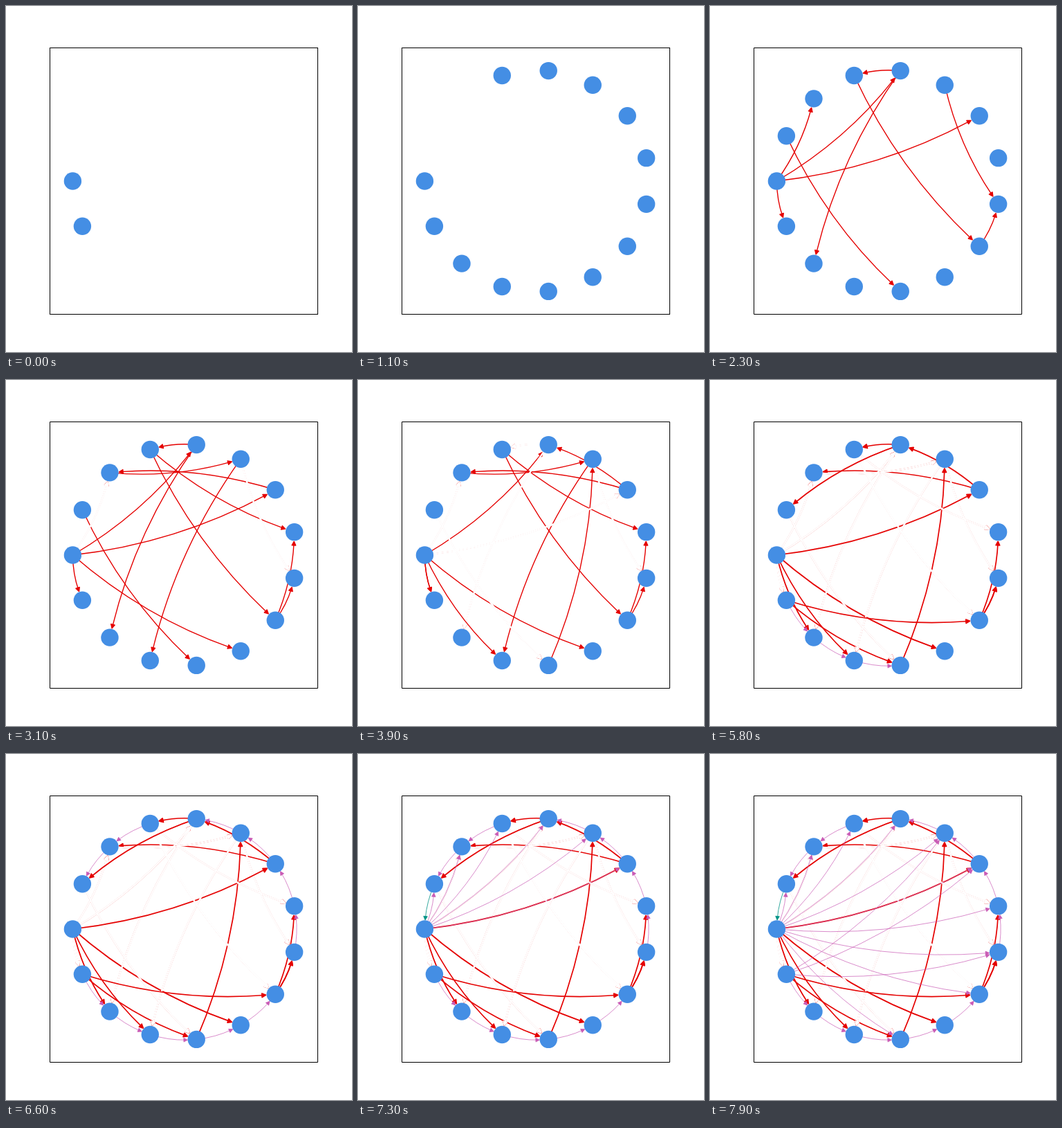
Recreate the animation shown at these times as an HTML page with a canvas. Size 500 px wide and 500 px high, loop 8000 ms.

```html
<!DOCTYPE html>
<html lang="en">
<head>
<meta charset="utf-8">
<title>Graph edges</title>
<style>
  html, body { margin: 0; width: 100%; height: 100%; overflow: hidden; background: #fff; }
  canvas { display: block; }
</style>
</head>
<body>
<canvas id="stage" width="500" height="500"></canvas>
<script>
const ctx = document.getElementById('stage').getContext('2d');
const LOOP = 8000, STEP = 100, EDGES_FROM = 14, BOLD_FROM = 52;
const REACH = 12;

const nodes = Array.from({ length: 15 }, (_, k) => {
  const a = k * Math.PI * 2 / 15;
  return { x: 258.3 - 161.9 * Math.cos(a), y: 253 + 160.3 * Math.sin(a) };
});

// One word per step: from>to, "+" joins edges, "." is a pause.
// Prefix: none = red, x = erase, p = purple, t = teal.
const script = `
  0>1 14>4 0>13 6>7 11>12
  0>11 0>9 11>2 12>6 10>7
  0>5 10>3 12>8 13>10
  9>13 x0>13 6>8 x10>7 0>1 x14>4 4>10 x11>2 x0>9
  9>11 x11>12 0>3 x0>11 x12>6 .
  11>12 0>9 0>2 x0>1 x12>6 1>4 6>7 x10>3 x0>1
  x13>10 x12>8 11>14 1>6
  p1>2 p2>3 p3>4 p4>5 p5>6 p7>8 p8>9 p9>10 p10>11 p12>13 p13>14 t14>0
  p0>14 p0>13 p0>12 p0>11 p0>10 p0>9 p0>8 p0>7 p0>6 p0>4
  p1>9 p1>7+p1>10`;

const pens = {
  '': { color: '#e50000', line: 1.4, head: 1.4 },
  x: { color: '#fff', line: 2.4, head: 1.6 },
  p: { color: '#c95bb5', line: 0.7, head: 0.7 },
  t: { color: '#029386', line: 0.8, head: 0.8 }
};

const mix = (a, b, t) => ({ x: a.x + (b.x - a.x) * t, y: a.y + (b.y - a.y) * t });

function makeEdge(word) {
  const [, kind, from, to] = word.match(/([xpt]?)(\d+)>(\d+)/);
  const a = nodes[from], b = nodes[to], mid = mix(a, b, 0.5);
  const c = { x: mid.x - 0.1 * (b.y - a.y), y: mid.y + 0.1 * (b.x - a.x) };
  // Cut the curve where it meets the rim of the end node.
  let t = 1, bend, near, tip;
  do {
    t -= 0.001;
    bend = mix(a, c, t);
    near = mix(c, b, t);
    tip = mix(bend, near, t);
  } while (Math.hypot(b.x - tip.x, b.y - tip.y) < REACH);
  return { kind, a, bend, tip, angle: Math.atan2(tip.y - bend.y, tip.x - bend.x) };
}

const steps = script.trim().split(/\s+/).map(word =>
  word === '.' ? [] : word.split('+').map(makeEdge));

function drawEdge({ kind, a, bend, tip, angle }, bold) {
  const pen = pens[kind];
  const extra = kind === '' && bold ? 0.3 : 0;
  const back = 1.1 * pen.head;
  const end = { x: tip.x - 3 * Math.cos(angle), y: tip.y - 3 * Math.sin(angle) };
  ctx.strokeStyle = ctx.fillStyle = pen.color;
  ctx.lineJoin = 'round';
  ctx.lineWidth = pen.line + extra;
  ctx.beginPath();
  ctx.moveTo(a.x, a.y);
  ctx.quadraticCurveTo(bend.x, bend.y, end.x, end.y);
  ctx.stroke();

  ctx.save();
  ctx.translate(tip.x, tip.y);
  ctx.rotate(angle);
  ctx.lineWidth = pen.head + extra;
  ctx.beginPath();
  ctx.moveTo(-back, 0);
  ctx.lineTo(-back - 5.6, -2.8);
  ctx.lineTo(-back - 5.6, 2.8);
  ctx.closePath();
  ctx.fill();
  ctx.stroke();
  ctx.restore();
}

function draw(step) {
  ctx.fillStyle = '#fff';
  ctx.fillRect(0, 0, 500, 500);
  for (const edges of steps.slice(0, Math.max(0, step - EDGES_FROM + 1))) {
    for (const edge of edges) drawEdge(edge, step >= BOLD_FROM);
  }
  ctx.fillStyle = '#448ee4';
  for (const { x, y } of nodes.slice(0, step + 2)) {
    ctx.beginPath();
    ctx.arc(x, y, 12.7, 0, Math.PI * 2);
    ctx.fill();
  }
  ctx.strokeStyle = '#000';
  ctx.lineWidth = 1;
  ctx.strokeRect(63.5, 60.5, 387, 385);
}

const start = performance.now();
function tick() {
  draw(Math.floor((performance.now() - start) % LOOP / STEP));
  requestAnimationFrame(tick);
}
tick();
</script>
</body>
</html>
```
